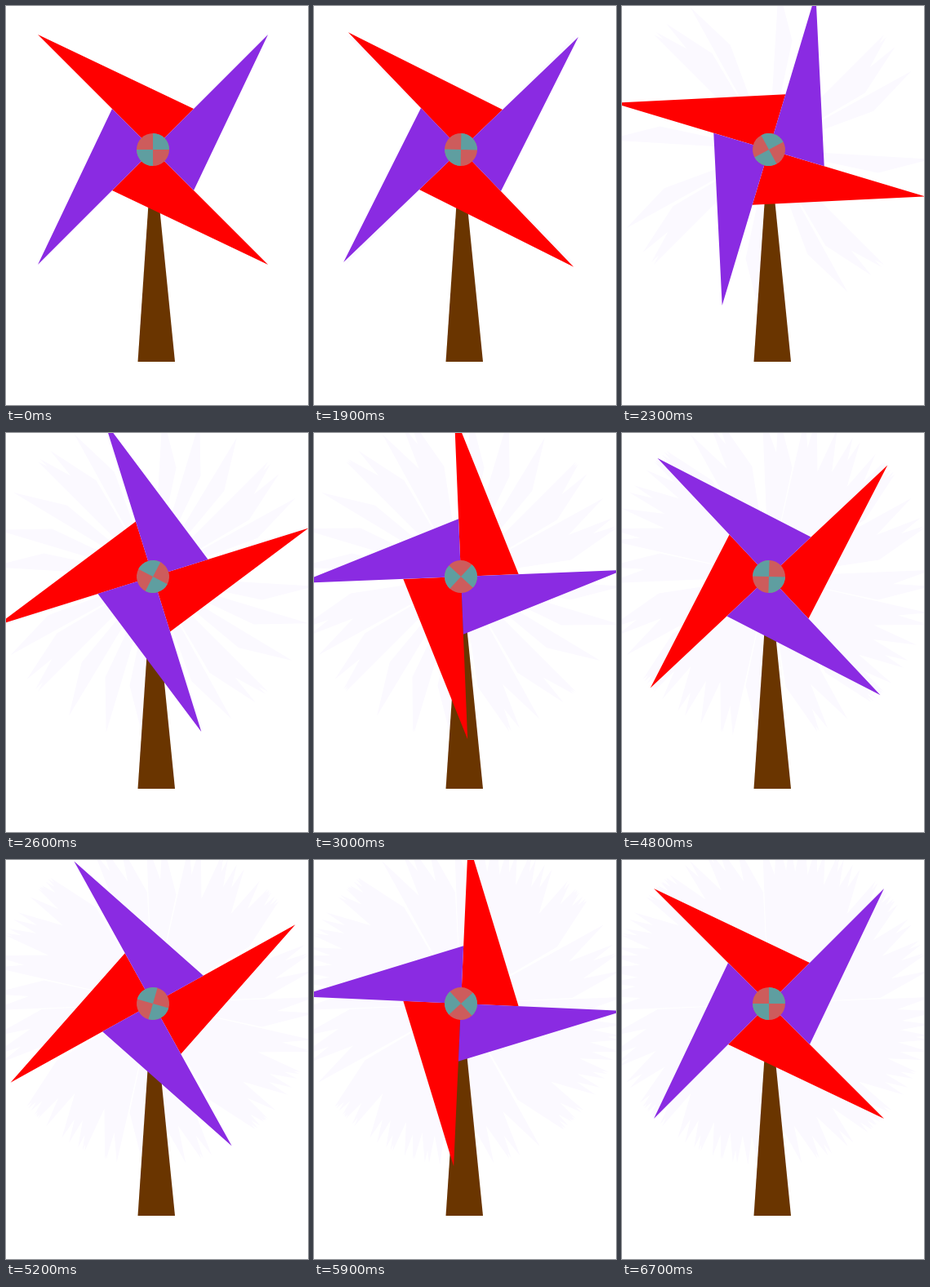
Write an HTML page that moves like this. It is 370x489 px and loops after 8.2 s.

```html
<!DOCTYPE html>
<html lang="en">
<head>
<meta charset="utf-8">
<title>Pinwheel</title>
<style>
  html, body { margin: 0; width: 100%; height: 100%; overflow: hidden; background: #fff; }
  svg { display: block; width: 370px; height: 489px; }
</style>
</head>
<body>
<svg viewBox="0 0 370 489">
  <path id="trail" fill="#fbf9ff" transform="translate(180 176)"/>
  <path fill="#6a3500" d="M179 176H181L207 436H161.5Z"/>
  <g id="wheel">
    <path fill="#f00" d="M0 0L-141 -141L50 -50ZM0 0L141 141L-50 50Z"/>
    <path fill="#8a2be2" d="M0 0L141 -141L50 50ZM0 0L-141 141L-50 -50Z"/>
    <circle r="20" fill="#cd5c5c"/>
    <path fill="#5f9ea0" d="M0 0V-20A20 20 0 0 1 20 0ZM0 0V20A20 20 0 0 1 -20 0Z"/>
  </g>
</svg>
<script>
const LOOP = 8200, TICK = 100, STEPS = 20, TURN = 455;
const OUT_AT = 1900, BACK_AT = 4800;
const wheel = document.getElementById('wheel');
const trail = document.getElementById('trail');

// cubic-bezier(.25, .1, .25, 1)
function ease(x) {
  if (x <= 0) return 0;
  if (x >= 1) return 1;
  let lo = 0, hi = 1;
  for (let i = 0; i < 30; i++) {
    const u = (lo + hi) / 2;
    if (0.75 * u * (1 - u) + u ** 3 < x) lo = u; else hi = u;
  }
  const u = lo, v = 1 - u;
  return 0.3 * u * v * v + 3 * u * u * v + u ** 3;
}

function angleAt(step) {
  if (step === 0) return 0;
  if (step <= STEPS) return TURN * ease(Math.max(0.006, 0.2167 + 0.0547 * (step - 5)));
  return TURN * (1 - ease(0.2334 + 0.0546 * (step - STEPS - 5)));
}

function stepAt(ms) {
  const count = start => Math.max(0, Math.min(STEPS, Math.floor((ms - start) / TICK) + 1));
  return count(OUT_AT) + count(BACK_AT);
}

// Faint slivers left behind by the four blades
function slivers(deg) {
  let d = '';
  for (let k = 0; k < 4; k++) {
    const a = (deg + 90 * k) * Math.PI / 180, c = Math.cos(a), s = Math.sin(a);
    const at = (x, y) => (x * c - y * s).toFixed(1) + ' ' + (x * s + y * c).toFixed(1);
    d += `M0 0L${at(-141, -141)}L${at(-81, -110)}Z`;
  }
  return d;
}

const trails = [''];
for (let i = 0; i < 2 * STEPS; i++) trails.push(trails[i] + slivers(angleAt(i)));

let shown = -1;
function draw(ms) {
  const step = stepAt(ms);
  if (step === shown) return;
  shown = step;
  wheel.setAttribute('transform', `translate(180 176) rotate(${angleAt(step).toFixed(3)})`);
  trail.setAttribute('d', trails[step]);
}

const begin = performance.now();
function frame() {
  draw((performance.now() - begin) % LOOP);
  requestAnimationFrame(frame);
}
frame();
</script>
</body>
</html>
```
